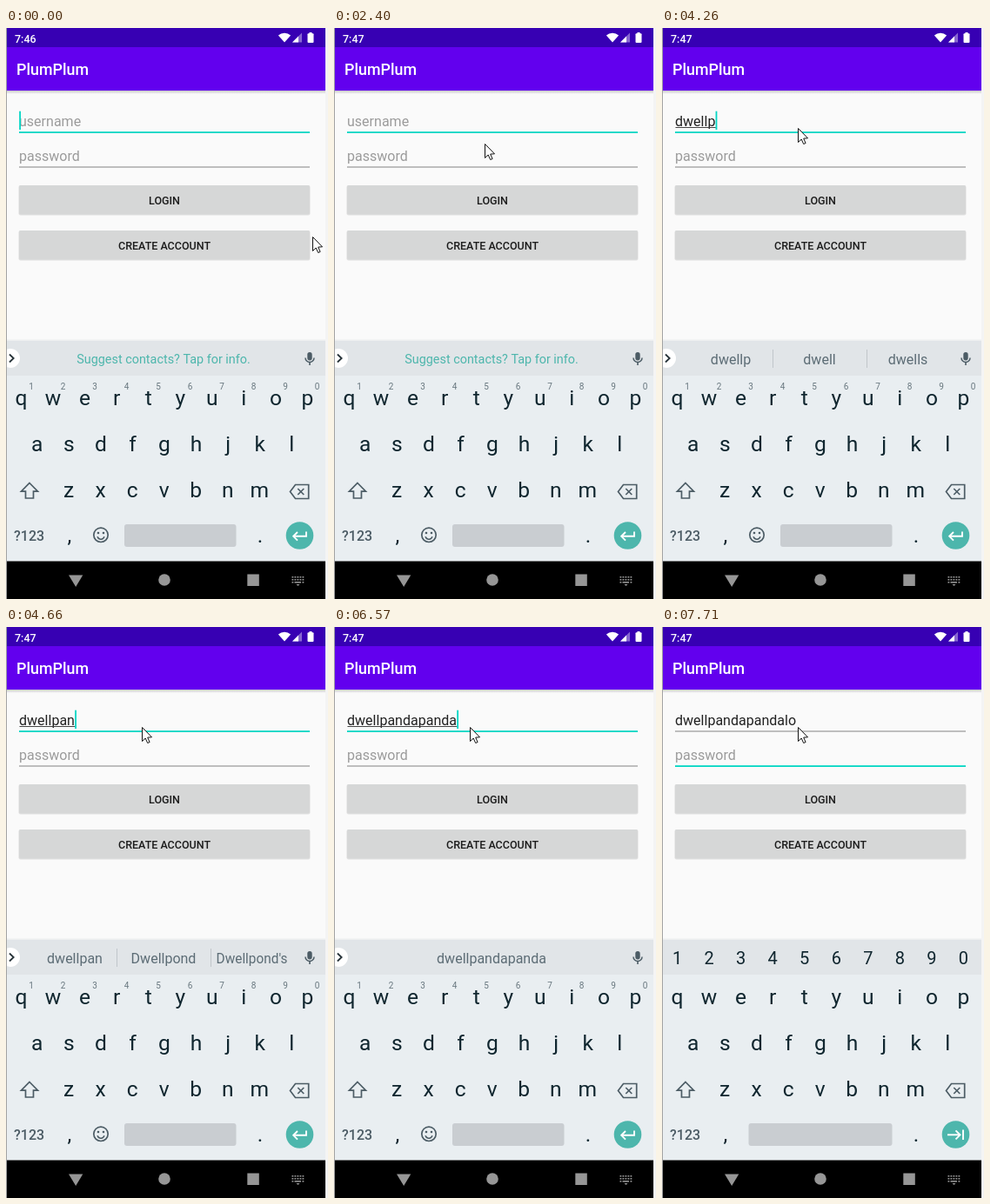
These frames come from a looping animation (370x657 px, 8000 ms). An HTML page with a canvas:

```html
<!DOCTYPE html>
<html lang="en">
<head>
<meta charset="utf-8">
<title>Login form</title>
<style>
html, body { margin: 0; width: 370px; height: 657px; overflow: hidden; background: #fafafa; }
canvas { display: block; }
</style>
</head>
<body>
<canvas id="stage" width="370" height="657"></canvas>
<script>
const ctx = document.getElementById('stage').getContext('2d');
const LOOP = 8000;
const TEAL = '#03d6c4', MINT = '#4db6ac', SLATE = '#4c5c65', INK = '#10262f';
const NAME = 'dwellpandapandalo';

// Each entry changes part of the state from its time on.
const timeline = [
  [0, { clock: '7:46', mouse: [352, 240], typed: 0, caret: true, words: null, password: false }],
  [150, { caret: false }],
  [550, { caret: true }],
  [1080, { caret: false }],
  [1510, { caret: true }],
  [2100, { caret: false, mouse: [332, 195] }],
  [2250, { mouse: [284, 148] }],
  [2400, { clock: '7:47', mouse: [173, 133] }],
  [2520, { mouse: [156, 115] }],
  [2650, { caret: true }],
  [3070, { caret: false }],
  [3470, { caret: true, typed: 1 }],
  [3590, { typed: 2 }],
  [3740, { typed: 3 }],
  [4020, { typed: 4, words: ['dwel', 'dwell', 'dwells'] }],
  [4140, { typed: 5, words: ['dwell', 'dwells', 'dwelt'] }],
  [4260, { typed: 6, words: ['dwellp', 'dwell', 'dwells'] }],
  [4410, { typed: 7, words: ['dwellpa', 'dwellings', 'Dwellpond'] }],
  [4660, { typed: 8, words: ['dwellpan', 'Dwellpond', "Dwellpond's"], squeeze: [1, 1, 0.96] }],
  [4810, { typed: 10, words: ['dwellpand'] }],
  [5180, { words: ['dwellpanda'] }],
  [5330, { typed: 11, words: ['dwellpandap'] }],
  [5480, { typed: 13, words: ['dwellpandapan', 'dwellpandapa of', 'dwellpa…apa on'], squeeze: [0.77, 0.8, 0.72] }],
  [6010, { caret: false }],
  [6570, { caret: true, typed: 15, words: ['dwellpandapanda'] }],
  [6850, { typed: 16, words: ['dwellpandapandal'] }],
  [7000, { typed: 17, words: [NAME] }],
  [7560, { password: true }],
  [7710, { caret: false }]
];

function stateAt(t) {
  const s = {};
  for (const [at, change] of timeline) {
    if (at > t) break;
    if (change.words) s.squeeze = null;
    Object.assign(s, change);
  }
  return s;
}

function rect(x, y, w, h, color) {
  ctx.fillStyle = color;
  ctx.fillRect(x, y, w, h);
}

function roundBox(x, y, w, h, r, color) {
  ctx.fillStyle = color;
  ctx.beginPath();
  ctx.roundRect(x, y, w, h, r);
  ctx.fill();
}

function disc(x, y, r, color) {
  ctx.fillStyle = color;
  ctx.beginPath();
  ctx.arc(x, y, r, 0, Math.PI * 2);
  ctx.fill();
}

function poly(points, color) {
  ctx.fillStyle = color;
  ctx.beginPath();
  for (const [x, y] of points) ctx.lineTo(x, y);
  ctx.closePath();
  ctx.fill();
}

function line(points, color, width, closed) {
  ctx.strokeStyle = color;
  ctx.lineWidth = width;
  ctx.beginPath();
  for (const [x, y] of points) ctx.lineTo(x, y);
  if (closed) ctx.closePath();
  ctx.stroke();
}

function arc(x, y, r, from, to, color, width) {
  ctx.strokeStyle = color;
  ctx.lineWidth = width;
  ctx.beginPath();
  ctx.arc(x, y, r, from * Math.PI, to * Math.PI);
  ctx.stroke();
}

function text(str, x, y, size, color, align = 'left', weight = 400) {
  ctx.font = `${weight} ${size}px Roboto, "Open Sans", sans-serif`;
  ctx.fillStyle = color;
  ctx.textAlign = align;
  ctx.fillText(str, x, y);
}

function shade(y, h, alpha) {
  const g = ctx.createLinearGradient(0, y, 0, y + h);
  g.addColorStop(0, `rgba(0,0,0,${alpha})`);
  g.addColorStop(1, 'rgba(0,0,0,0)');
  rect(0, y, 370, h, g);
}

function header(clock) {
  rect(0, 0, 370, 22, '#3700b3');
  rect(0, 22, 370, 50, '#6200ee');
  shade(72, 4, 0.2);
  text(clock, 10, 16.5, 12.5, '#fff', 'left', 500);
  text('PlumPlum', 12, 54, 17.9, '#fff', 'left', 500);

  // wifi, signal, battery
  ctx.fillStyle = '#fff';
  ctx.beginPath();
  ctx.moveTo(320, 16.5);
  ctx.arc(320, 16.5, 10.8, -0.73 * Math.PI, -0.27 * Math.PI);
  ctx.fill();
  poly([[329, 16.5], [340, 5.5], [340, 16.5]], 'rgba(255,255,255,.4)');
  poly([[329, 16.5], [336, 9.5], [336, 16.5]], '#fff');
  roundBox(346.5, 6.3, 7, 10.7, 1, '#fff');
  rect(348.5, 5, 3, 2, '#fff');
}

function button(label, y) {
  roundBox(14.5, y, 335, 34.6, 2, 'rgba(0,0,0,.1)');
  roundBox(15, y, 334, 33.5, 2, '#d6d7d7');
  text(label, 182, y + 21.7, 12.5, '#1c1c1c', 'center', 500);
}

function fieldLine(y, active) {
  if (active) rect(15, y - 0.8, 334, 1.8, TEAL);
  else rect(15, y - 0.5, 334, 1, '#848484');
}

function form(s) {
  const value = NAME.slice(0, s.typed);
  if (value) text(value, 15, 113, 16.05, '#212121');
  else text('username', 15, 113, 16.05, '#9b9b9b');
  const width = value ? ctx.measureText(value).width : 0;
  if (value && !s.password) rect(15.5, 114, width, 1, '#444');
  fieldLine(120, !s.password);
  text('password', 15, 153, 16.05, '#9b9b9b');
  fieldLine(160, s.password);
  if (s.caret) {
    if (s.password) rect(15.2, 136, 1.8, 21.5, TEAL);
    else rect(15.2 + width, 95.7, 1.8, 21.3, TEAL);
  }
  button('LOGIN', 181);
  button('CREATE ACCOUNT', 233);
}

function strip(s) {
  rect(0, 360, 370, 40, '#e1e5e8');
  if (s.password) {
    [...'1234567890'].forEach((d, i) => text(d, 17.5 + 36.55 * i, 388, 20, INK, 'center'));
    return;
  }
  disc(5, 380, 11, '#fff');
  line([[4, 375.5], [8.7, 380], [4, 384.5]], '#263238', 1.8);
  roundBox(346.3, 373, 5.4, 9.5, 2.7, SLATE);
  arc(349, 379.5, 5, 0, 1, SLATE, 1.5);
  rect(348.2, 384, 1.6, 4, SLATE);

  if (!s.words) {
    text('Suggest contacts? Tap for info.', 181, 386, 14.4, MINT, 'center');
    return;
  }
  const single = s.words.length === 1;
  s.words.forEach((word, i) => {
    ctx.save();
    ctx.translate(single ? 181 : [79, 181, 282.5][i], 386.5);
    ctx.scale(s.squeeze ? s.squeeze[i] : 1, 1);
    text(word, 0, 0, 16, '#5c6c75', 'center');
    ctx.restore();
  });
  if (!single) for (const x of [127, 235]) rect(x, 370, 1, 21, '#c0c6ca');
}

function keys(s) {
  rect(0, 400, 370, 213.5, '#e9eef1');
  const row = (letters, x, y) =>
    [...letters].forEach((c, i) => text(c, x + 36.55 * i, y, 24.6, INK, 'center'));
  row('qwertyuiop', 17.5, 434);
  row('asdfghjkl', 35.8, 487);
  row('zxcvbnm', 72, 540);
  row(',', 73, 592);
  row('.', 292, 592);
  if (!s.password) {
    [...'1234567890'].forEach((d, i) => text(d, 29 + 36.5 * i, 416, 10, '#68777f', 'center'));
  }

  // shift and backspace
  line([[27, 523.5], [36.5, 533.2], [31.5, 533.2], [31.5, 541], [22.5, 541], [22.5, 533.2], [17.5, 533.2]], SLATE, 1.7, true);
  line([[326.5, 533.5], [332.5, 525.5], [347.7, 525.5], [347.7, 541.5], [332.5, 541.5]], SLATE, 1.7, true);
  line([[335.3, 530], [342.3, 537]], SLATE, 1.7);
  line([[342.3, 530], [335.3, 537]], SLATE, 1.7);

  text('?123', 9, 589.5, 16, SLATE, 'left', 500);
  const left = s.password ? 99.5 : 136;
  roundBox(left, 571, 264.5 - left, 26, 3, '#c9cdd1');
  if (!s.password) {
    arc(109, 583.3, 8.2, 0, 2, SLATE, 1.7);
    disc(106, 581, 1.3, SLATE);
    disc(112, 581, 1.3, SLATE);
    arc(109, 584, 4.2, 0.1, 0.9, SLATE, 1.6);
  }

  disc(337.5, 584, 15.8, MINT);
  if (s.password) {
    line([[328, 584.3], [342, 584.3]], '#fff', 1.9);
    line([[337.5, 579.3], [342.5, 584.3], [337.5, 589.3]], '#fff', 1.9);
    line([[346, 578.5], [346, 590]], '#fff', 1.9);
  } else {
    line([[345, 579.5], [345, 584.8], [330.5, 584.8]], '#fff', 1.9);
    line([[335, 580], [330.2, 584.8], [335, 589.6]], '#fff', 1.9);
  }
}

function navBar() {
  const grey = '#969696';
  rect(0, 613.5, 370, 44, '#000');
  poly([[72, 629.5], [88.3, 629.5], [80.2, 643]], grey);
  disc(182, 635, 6.8, grey);
  rect(277.3, 628.5, 13.5, 13.5, grey);
  for (let i = 0; i < 10; i++) rect(328.5 + (i % 5) * 3, 631 + 3 * Math.floor(i / 5), 1.8, 1.6, grey);
  rect(328.5, 637, 1.8, 1.6, grey);
  rect(331.5, 637, 7.5, 1.6, grey);
  rect(340.5, 637, 1.8, 1.6, grey);
  poly([[333.5, 640], [337.5, 640], [335.5, 642]], grey);
}

function pointer([x, y]) {
  ctx.save();
  ctx.translate(x + 0.5, y + 0.5);
  const shape = [[0, 0], [0, 16], [3.7, 12.5], [6.2, 18], [8.6, 17], [6.2, 11.6], [11, 11.3]];
  poly(shape, '#fff');
  line(shape, '#111', 1, true);
  ctx.restore();
}

function draw() {
  const s = stateAt(performance.now() % LOOP);
  rect(0, 0, 370, 657, '#fafafa');
  header(s.clock);
  form(s);
  rect(0, 358.5, 370, 1.5, '#eeeff0');
  strip(s);
  keys(s);
  navBar();
  rect(0, 0, 1, 657, '#a3a3a3');
  rect(367, 0, 3, 657, '#f4f4f4');
  pointer(s.mouse);
  requestAnimationFrame(draw);
}
draw();
</script>
</body>
</html>
```
